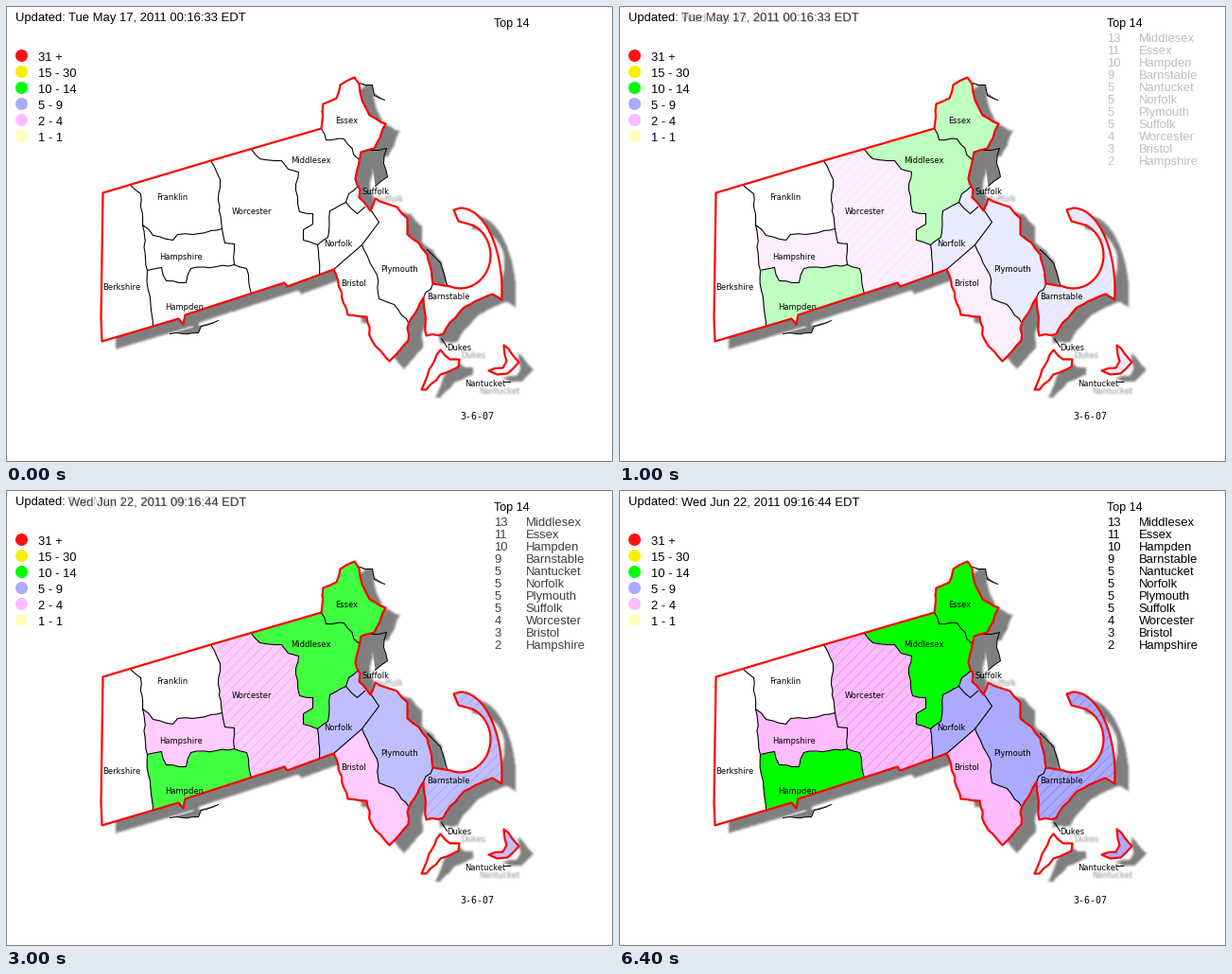
A matplotlib script that plays this animation: 642x482 px, repeating every 8 s.

```python
import numpy as np
import matplotlib.pyplot as plt
from matplotlib.animation import FuncAnimation
from matplotlib.patches import Circle, PathPatch, Polygon, Rectangle
from matplotlib.path import Path

W, H, DPI = 642, 482, 128
PX = 72 / DPI
SHIFT = np.array([15, 8])

GREEN, BLUE, PINK = (0, 255, 0), (170, 170, 255), (255, 187, 255)
RED, GRAY = "#ff0000", "#808080"

rng = np.random.default_rng(7)


def rough(*keys, amp=1.1, step=6):
    """Polyline through the key points with small seeded wiggles between."""
    keys = np.array(keys, float)
    out = []
    for p, q in zip(keys, keys[1:]):
        n = max(1, int(np.hypot(*(q - p)) / step))
        line = p + (q - p) * np.arange(n)[:, None] / n
        line[1:] += rng.uniform(-amp, amp, (n - 1, 2))
        out.append(line)
    return np.vstack(out + [keys[-1:]])


def arc(cx, cy, rx, ry, start, stop):
    a = np.radians(np.linspace(start, stop, 24))
    return np.column_stack([cx + rx * np.cos(a), cy + ry * np.sin(a)])


def join(*parts):
    return np.vstack(parts)


# Land, clockwise from the north-west corner
north = [(102, 197), (216, 163), (333, 129)]
north_shore = rough(
    (333, 129), (335, 103), (349, 97), (353, 83), (368, 75), (373, 82),
    (376, 99), (384, 115), (401, 124), (395, 139), (389, 150), (375, 154),
    (369, 182), (374, 194), (373, 202), (385, 216), (390, 203))
bay = rough((390, 203), (413, 212), (424, 224), (424, 241), (436, 250),
            (445, 262), (451, 293))
cape = join(arc(480, 263, 32, 35, 110, -65), [(478, 227), (473, 215)],
            arc(480, 300, 44, 87, -90, 6))
south_shore = rough(
    (524, 310), (514, 304), (484, 318), (469, 334), (462, 346), (444, 348),
    (441, 308), (424, 340), (425, 353), (405, 375), (386, 352), (381, 328),
    (361, 326), (346, 278))
south = [(297, 296), (294, 292), (189, 326), (187, 336), (182, 330),
         (101, 354), (100, 330)]
mainland = join(north, north_shore, bay, cape, south_shore, south)
dukes = rough((439, 405), (447, 384), (459, 363), (469, 373), (479, 373),
              (478, 381), (459, 389), (444, 405))
nantucket = rough((510, 385), (525, 382), (529, 375), (526, 358), (542, 376),
                  (530, 388), (519, 389))
lands = [mainland, dukes, nantucket]

# Inner borders, each shared by two counties
berk_1 = rough((131, 189), (142, 198), (144, 231))
berk_2 = rough((144, 231), (149, 279))
berk_3 = rough((149, 279), (150, 300), (155, 338))
frank_s = rough((144, 231), (155, 242), (176, 247), (181, 241), (204, 240),
                (228, 235))
worc_1 = rough((216, 163), (226, 183), (224, 205), (228, 235))
worc_2 = rough((228, 235), (231, 250), (241, 251), (241, 273))
worc_3 = rough((241, 273), (254, 277), (259, 304))
hamp_s = rough((149, 279), (164, 276), (169, 290), (190, 292), (195, 277),
               (222, 275), (241, 273))
mid_w = rough((259, 151), (268, 161), (291, 163), (298, 172), (309, 175),
              (306, 194), (310, 217), (324, 219), (324, 230), (314, 236),
              (314, 247), (329, 252))
norf_w = rough((329, 252), (331, 284))
mid_s = rough((329, 252), (340, 244), (342, 216), (359, 207))
suff_n = rough((359, 207), (362, 198), (372, 190))
suff_s = rough((359, 207), (371, 219), (379, 212))
essex_s = rough((333, 129), (338, 141), (357, 140), (372, 161))
norf_e = rough((386, 216), (394, 228), (376, 252), amp=0)
bris_n = rough((376, 252), (346, 278), amp=0)
plym_w = rough((376, 252), (392, 284), (394, 309), (410, 315), (426, 336))
barn_w = rough((441, 308), (451, 293))
borders = [berk_1, berk_2, berk_3, frank_s, worc_1, worc_2, worc_3, hamp_s,
           mid_w, norf_w, mid_s, suff_n, suff_s, essex_s, norf_e, bris_n,
           plym_w, barn_w]

# Thin outlines out at sea and below the southern border
offshore = [
    rough((374, 81), (387, 83), (389, 94), (400, 99)),
    rough((385, 152), (402, 150), (399, 166), (403, 180), (390, 190)),
    rough((445, 257), (459, 271), (467, 297)),
    rough((173, 346), (203, 345), (206, 338), (224, 332)),
    rough((460, 351), (466, 360), amp=0),
    rough((526, 396), (532, 396), amp=0)]

# Seaward corners are loose: every fill is clipped to the land
COUNTIES = [
    (GREEN, None, join(essex_s, [(420, 161), (420, 60), (320, 60)])),
    (GREEN, None, join(mid_w, mid_s, suff_n, [(380, 190), (380, 161)],
                       essex_s[::-1])),
    (GREEN, None, join(hamp_s, worc_3, [(259, 320), (155, 350)],
                       berk_3[::-1])),
    (PINK, None, join(frank_s, worc_2, hamp_s[::-1], berk_2[::-1])),
    (PINK, (222, 160, 228), join(mid_w, norf_w, [(331, 300), (259, 320)],
                                 worc_3[::-1], worc_2[::-1], worc_1[::-1])),
    (PINK, None, join(plym_w, [(430, 390), (340, 390), (346, 278)])),
    (BLUE, None, join(mid_s, suff_s, norf_e, bris_n,
                      [(346, 290), (331, 290)], norf_w[::-1])),
    (BLUE, None, join(suff_n, [(385, 190), (385, 214)], suff_s[::-1])),
    (BLUE, None, join(norf_e, plym_w, [(430, 336)], barn_w,
                      [(460, 285), (460, 190), (386, 190)])),
    (BLUE, (140, 140, 240), join(barn_w, [(460, 285), (460, 200), (535, 200),
                                          (535, 360), (436, 360)])),
    (BLUE, None, nantucket)]

LABELS = [
    ("Essex", 348, 119), ("Middlesex", 301, 161), ("Franklin", 159, 200),
    ("Worcester", 238, 215), ("Suffolk", 376, 194), ("Hampshire", 162, 263),
    ("Norfolk", 336, 249), ("Plymouth", 396, 276), ("Berkshire", 102, 295),
    ("Bristol", 354, 291), ("Barnstable", 445, 305), ("Hampden", 168, 316),
    ("Dukes", 466, 359), ("Nantucket", 485, 397)]
AT_SEA = ("Suffolk", "Dukes", "Nantucket")
LEGEND = [("31 +", "#ff1111"), ("15 - 30", "#f5f000"), ("10 - 14", "#00ff00"),
          ("5 - 9", "#aaaaff"), ("2 - 4", "#ffbbff"), ("1 - 1", "#ffffbb")]
RANKING = [(13, "Middlesex"), (11, "Essex"), (10, "Hampden"),
           (9, "Barnstable"), (5, "Nantucket"), (5, "Norfolk"),
           (5, "Plymouth"), (5, "Suffolk"), (4, "Worcester"),
           (3, "Bristol"), (2, "Hampshire")]

plt.rcParams["hatch.linewidth"] = PX
fig = plt.figure(figsize=(W / DPI, H / DPI), dpi=DPI, facecolor="white")
ax = fig.add_axes([0, 0, 1, 1])
ax.set(xlim=(-0.5, W - 0.5), ylim=(H - 0.5, -0.5))
ax.axis("off")


def write(x, y, s, size=13, font="Liberation Sans", **kw):
    return ax.text(x, y + 0.5, s, fontsize=size * PX, family=font,
                   va="baseline", **kw)


def label(x, y, s, **kw):
    write(x, y + 4, s, 8.4, "DejaVu Sans", **kw)


def tint(color, level):
    return tuple(1 - level * (1 - c / 255) for c in color)


def shadow():
    """Soft grey copy of the land, as an RGBA image."""
    yy, xx = np.mgrid[:H, :W]
    grid = np.column_stack([xx.ravel(), yy.ravel()])
    mask = np.zeros(H * W)
    for land in lands:
        mask[Path(land + SHIFT).contains_points(grid)] = 1
    mask = mask.reshape(H, W)
    for axis in (0, 1):
        for _ in range(2):
            mask = sum(np.roll(mask, k, axis) for k in (-1, 0, 1)) / 3
    rgba = np.full((H, W, 4), 0.5)
    rgba[..., 3] = mask
    return rgba


ax.imshow(shadow(), extent=(-0.5, W - 0.5, H - 0.5, -0.5), aspect="auto",
          interpolation="nearest", zorder=1)
for line in offshore:
    ax.add_patch(Polygon(line, fc=GRAY, lw=0, zorder=2))
    ax.plot(*line.T, color="black", lw=PX, zorder=2)
for land in lands:
    ax.add_patch(Polygon(land, fc="white", lw=0, zorder=3))

land_path = Path.make_compound_path(
    *[Path(join(land, land[:1]), closed=True) for land in lands])
fills = []
for color, stripe, pts in COUNTIES:
    patch = PathPatch(Path(pts), lw=0, zorder=4, aa=False,
                      hatch="////" if stripe else None)
    ax.add_patch(patch)
    patch.set_clip_path(land_path, ax.transData)
    fills.append((patch, color, stripe))

for line in borders:
    ax.plot(*line.T, color="black", lw=1.1 * PX, zorder=5)
for land in lands:
    ax.add_patch(Polygon(land, fill=False, ec=RED, lw=2.2 * PX,
                         joinstyle="round", zorder=6))

for name, x, y in LABELS:
    if name in AT_SEA:
        for dx, dy in np.ndindex(3, 3):
            label(x + SHIFT[0] + dx - 1, y + SHIFT[1] + dy - 1, name,
                  color="gray", alpha=0.1, zorder=7)
    label(x, y, name, zorder=8)
write(480, 436, "3-6-07", 10, "DejaVu Sans Mono")

for i, (span, color) in enumerate(LEGEND):
    ax.add_patch(Circle((16, 52 + 17 * i), 6.5, fc=color, lw=0))
    write(34, 57 + 17 * i, span)

write(9, 15, "Updated: ")
old_date = write(65, 15, "Tue May 17, 2011 00:16:33 EDT")
new_date = write(65, 15, "Wed Jun 22, 2011 09:16:44 EDT")

write(516, 21, "Top 14", 12.5)
ranking = []
for i, (count, name) in enumerate(RANKING):
    ranking += [write(516, 37 + 13 * i, str(count)),
                write(549, 37 + 13 * i, name)]

ax.add_patch(Rectangle((0, 0), W - 1, H - 1, fill=False, ec=GRAY, lw=PX,
                       snap=False, zorder=9))


def update(second):
    level = min(second, 4) / 4
    for patch, color, stripe in fills:
        patch.set_facecolor(tint(color, level))
        if stripe:
            patch.set_edgecolor(tint(stripe, level))
    old_date.set_alpha(1 - level)
    new_date.set_alpha(level)
    for text in ranking:
        text.set_color(tint((0, 0, 0), level))
        text.set_visible(level > 0)


anim = FuncAnimation(fig, update, frames=8, interval=1000, repeat=True,
                     init_func=lambda: update(0))
plt.show()
```
